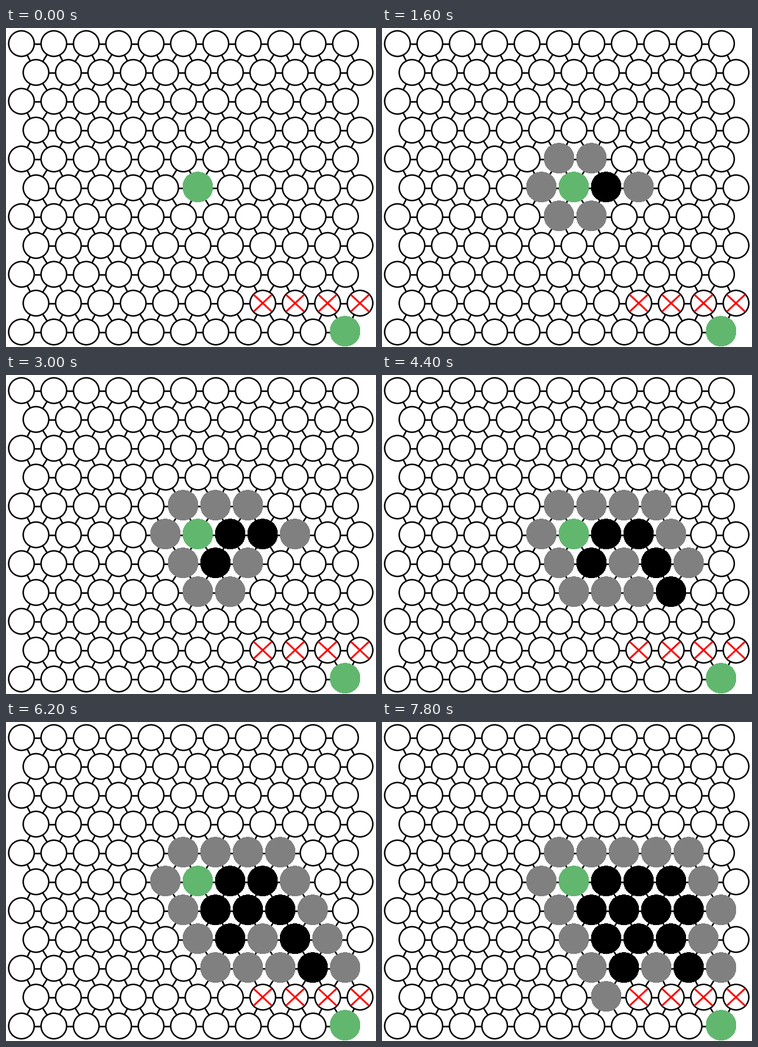
A matplotlib script that plays this animation: 628 by 542 pixels, repeating every 8 s.

```python
import matplotlib.pyplot as plt
from matplotlib.animation import FuncAnimation
from matplotlib.collections import LineCollection
from matplotlib.patches import Circle

W, H, DPI = 628, 542, 100
N = 11
STEP_MS, FRAMES = 200, 40
GREEN, GRAY, BLACK = "#62b76f", "#808080", "#000000"
START, GOAL = (5, 5), (10, 10)
WALLS = [(9, c) for c in range(7, N)]
VISITS = [START, (5, 6), (6, 6), (5, 7), (6, 8), (7, 8), (8, 9),
          (6, 7), (7, 6), (8, 7), (5, 8), (6, 9), (7, 7)]


def px(points):
    """Pixels to points."""
    return points * 72 / DPI


def center(cell):
    r, c = cell
    return 26.2 + 24.7 * (r % 2) + 55 * c, 26.5 + 49 * r


def neighbors(cell):
    """Clockwise from the east, inside the grid."""
    r, c = cell
    k = r % 2
    around = [(r, c + 1), (r + 1, c + k), (r + 1, c + k - 1),
              (r, c - 1), (r - 1, c + k - 1), (r - 1, c + k)]
    return [(a, b) for a, b in around if 0 <= a < N and 0 <= b < N]


def search_steps():
    """One (cell, colour) per step: a visit, then each cell it opens."""
    seen = {START, GOAL, *WALLS}
    steps = []
    for cell in VISITS:
        if cell != START:
            steps.append((cell, BLACK))
        for n in neighbors(cell):
            if n not in seen:
                seen.add(n)
                steps.append((n, GRAY))
    return steps


fig = plt.figure(figsize=(W / DPI, H / DPI), dpi=DPI, facecolor="white")
ax = fig.add_axes([0, 0, 1, 1])
ax.set_xlim(0, W)
ax.set_ylim(H, 0)
ax.axis("off")

cells = [(r, c) for r in range(N) for c in range(N)]
edges = [(center(a), center(b)) for a in cells for b in neighbors(a) if a < b]
ax.add_collection(LineCollection(edges, colors="black", linewidths=px(2.6),
                                 zorder=1))

discs = {}
for cell in cells:
    x, y = center(cell)
    ax.add_patch(Circle((x, y), 21.7, fc="white", ec="black", lw=px(2.5),
                        zorder=2))
    r, c = cell
    disc = Circle((25.5 + 25 * (r % 2) + 55 * c, 25.2 + 49 * r), 25.4,
                  lw=0, fc=GREEN, antialiased=False, visible=False, zorder=4)
    discs[cell] = ax.add_patch(disc)

for cell in WALLS:
    x, y = center(cell)
    x -= 0.2
    for s in (-1, 1):
        ax.plot([x - 15.5, x + 15.5], [y - 14.5 * s, y + 14.5 * s],
                color="red", lw=px(3), solid_capstyle="butt", zorder=3)

steps = search_steps()


def draw(i):
    shown = {START: GREEN, GOAL: GREEN}
    shown.update(steps[:i])
    for cell, disc in discs.items():
        disc.set_visible(cell in shown)
        if cell in shown:
            disc.set_facecolor(shown[cell])
    return list(discs.values())


anim = FuncAnimation(fig, draw, frames=FRAMES, interval=STEP_MS,
                     init_func=lambda: draw(0), repeat=True, repeat_delay=0,
                     blit=False)
plt.show()
```
